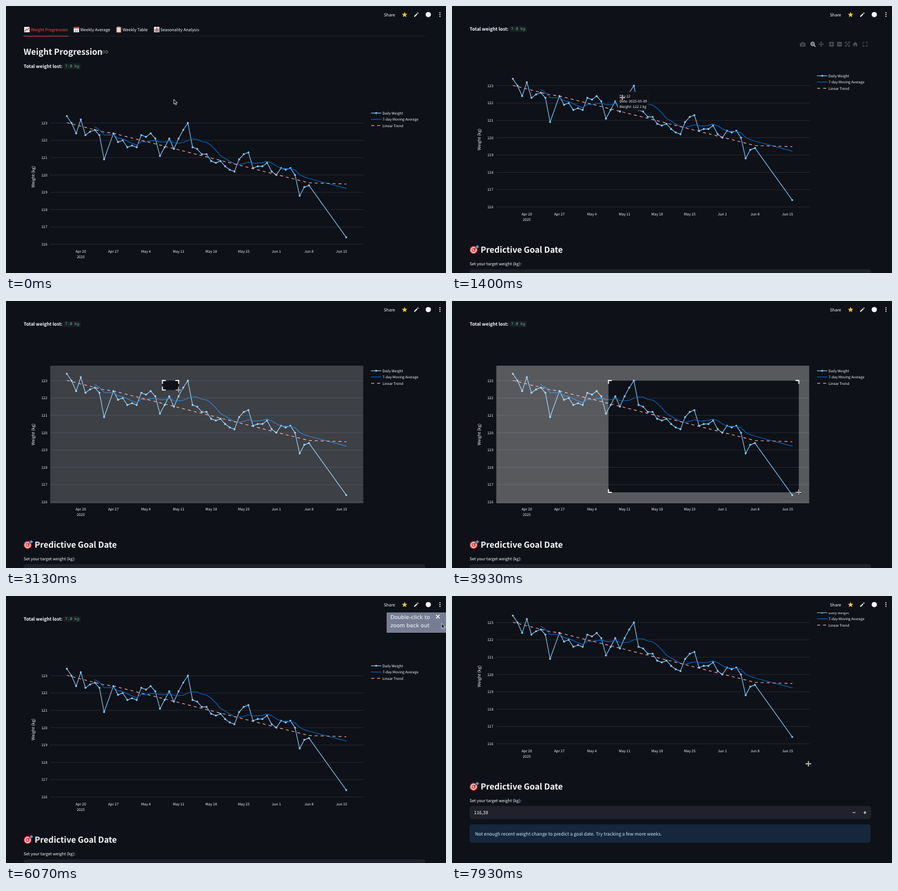
Animation of 800x487 px, one loop 8000 ms. Source, as an HTML page:

```html
<!DOCTYPE html>
<html lang="en">
<head>
<meta charset="utf-8">
<title>Weight dashboard</title>
<style>
html, body { margin: 0; width: 100%; height: 100%; overflow: hidden; background: #0e1117; }
svg { display: block; width: 100vw; height: 100vh; }
text { font-family: "Noto Sans CJK JP", "Noto Sans CJK SC", "Noto Sans CJK", "Open Sans", sans-serif; fill: #fafafa; text-rendering: geometricPrecision; }
.mono { font-family: "Noto Sans Mono", "DejaVu Sans Mono", monospace; fill: #4fc878; }
.note { font-family: "DejaVu Sans", sans-serif; fill: #fff; }
.ln { fill: none; stroke-linecap: round; stroke-linejoin: round; }
</style>
</head>
<body>
<svg id="stage" viewBox="0 0 800 487" preserveAspectRatio="none"></svg>
<script>
const LOOP = 8000;
const AREA = { l: 80.5, r: 650, t: 186, b: 437 };
const FULL = { x0: 110.6, dx: 8.466, y123: 213.4, dy: 31.6 };
const BOX = { x1: 284.5, y1: 145, x2: 630.5, y2: 349 };
const SCROLL = 68;
const BLUE = '#83c9ff', NAVY = '#0068c9', PINK = '#ffabab';

// Daily weights in tenths of a kg above 116; one day is missing, and so is the last week.
const tenths = [74, 70, 64, 72, 63, 65, 66, 63, 49, 64, 59, 60, 56, 57, 56, 63, 62, 64, 61, 51,
  56, 61, 55, 61, 66, 70, 56, 55, 52, 52, 48, 47, 48, 45, 43, 42, 49, 52, 53, 44, 45, 45, 47, 42,
  40, 44, 43, 44, 40, 28, 33, 34, 4];
const last = tenths.length - 1;
const daily = tenths.map((v, i) => ({ d: i === last ? 60 : i < 9 ? i : i + 1, w: 116 + v / 10 }));
const average = daily.slice(6).map((p, i) => ({
  d: p.d, w: daily.slice(i, i + 7).reduce((sum, q) => sum + q.w, 0) / 7
}));
const trend = daily.map((p, i) => ({ d: p.d, w: 123.02 - 3.54 * i / last }));

const day = d => new Date(Date.UTC(2025, 3, 17 + d));
const dayName = d => day(d).toLocaleDateString('en-US', { month: 'short', day: 'numeric', timeZone: 'UTC' });

const px = (v, d) => v.x0 + v.dx * d;
const py = (v, w) => v.y123 + v.dy * (123 - w);

// The view after the dragged box is stretched over the whole plot.
const kx = (AREA.r - AREA.l) / (BOX.x2 - BOX.x1), ky = (AREA.b - AREA.t) / (BOX.y2 - BOX.y1);
const ZOOM = {
  x0: AREA.l + (FULL.x0 - BOX.x1) * kx, dx: FULL.dx * kx,
  y123: AREA.t + (FULL.y123 - BOX.y1 - SCROLL) * ky, dy: FULL.dy * ky
};

const text = (x, y, s, size, more = '') => `<text x="${x}" y="${y}" font-size="${size}" ${more}>${s}</text>`;
const rect = (x, y, w, h, fill, more = '') => `<rect x="${x}" y="${y}" width="${w}" height="${h}" fill="${fill}" ${more}/>`;
const path = (d, stroke, w = 1, more = '') => `<path class="ln" d="${d}" stroke="${stroke}" stroke-width="${w}" ${more}/>`;
const dot = (x, y, r, fill) => `<circle cx="${x}" cy="${y}" r="${r}" fill="${fill}"/>`;
const bold = 'font-weight="600"', mid = 'text-anchor="middle"';
const DASH = 'stroke-dasharray="5.4" style="stroke-linecap:butt"';

function chart(v, id) {
  const line = pts => 'M' + pts.map(p => px(v, p.d).toFixed(2) + ' ' + py(v, p.w).toFixed(2)).join('L');
  let axes = '', first = true;
  for (let w = 116; w <= 123; w++) {
    const y = py(v, w);
    if (y < AREA.t - 1 || y > AREA.b) continue;
    axes += path(`M${AREA.l} ${y}H${AREA.r}`, '#31333f', .75) + text(75, y + 2.4, w, 6.5, 'text-anchor="end"');
  }
  for (let d = 3; d < 62; d += 7) {
    const x = px(v, d);
    if (x < AREA.l || x > AREA.r) continue;
    axes += text(x, 450.2, dayName(d), 6.5, mid);
    if (first) axes += text(x, 459.8, 2025, 6.5, mid);
    first = false;
  }
  return `<g id="${id}">${axes}<g clip-path="url(#plot)">` +
    path(line(daily), BLUE, 1.2) +
    daily.map(p => dot(px(v, p.d), py(v, p.w), 1.8, BLUE)).join('') +
    path(line(average), NAVY, 1.2) + path(line(trend), PINK, 1.2, DASH) + '</g></g>';
}

const tabs =
  rect(33, 38, 10, 10, '#e9edf0', 'rx="1"') + path('M34.5 46L37 42.5L39 44L42 39.5', '#e0393e', 1.3) +
  text(45, 46, 'Weight Progression', 7.5, 'style="fill:#ff4b4b"') +
  rect(123, 38, 10, 10, '#e9edf0', 'rx="1"') + rect(123, 38, 10, 3, '#d8383d') +
  text(128, 46.8, 17, 5.4, mid + ' style="fill:#444"') + text(135, 46, 'Weekly Average', 7.5) +
  rect(200.5, 38, 9, 10.5, '#a9764b', 'rx="1"') + rect(201.7, 39.5, 6.6, 8, '#eceff1') +
  rect(203, 37.5, 4, 2.4, '#8b98a2') + path('M203 42H207M203 44H207M203 46H207', '#a5afb5', .6) +
  text(212, 46, 'Weekly Table', 7.5) +
  rect(269, 38, 10, 10, '#e9edf0', 'rx="1"') + rect(270.3, 42, 2, 5.2, '#3da35a') +
  rect(273, 39.3, 2, 7.9, '#df4145') + rect(275.7, 40.8, 2, 6.4, '#2f80d0') +
  text(280.5, 46, 'Seasonality Analysis', 7.5) +
  path('M32 55H762', '#262730', .8) + path('M32 55H113', '#ff4b4b', 1.2);

const intro =
  text(32, 88.6, 'Weight Progression', 15, bold) +
  path('M179 81.4H177.4A2.2 2.2 0 0 0 177.4 86H179M181.5 81.4H183A2.2 2.2 0 0 1 183 86H181.5M178.2 83.7H182.2', '#85878e', 1) +
  text(32, 112.5, 'Total weight lost:', 8.4, bold) +
  rect(104.5, 104.5, 31.5, 11, '#1a1c24', 'rx="2"') + text(107.3, 112.4, '7.0 kg', 7.2, 'class="mono"');

const legend = ['Daily Weight', '7-day Moving Average', 'Linear Trend'].map((s, i) => {
  const y = 195.3 + 11.4 * i;
  return path(`M664 ${y}H682`, [BLUE, NAVY, PINK][i], 1.2, i === 2 ? DASH : '') +
    (i ? '' : dot(673, y, 1.8, BLUE)) + text(684.5, y + 2.4, s, 6.45);
}).join('');

const GREY = '#4c4e56';
const tools =
  rect(632.5, 135.3, 10, 6.6, GREY, 'rx="1"') + rect(635.5, 133.8, 4, 2, GREY) + dot(637.5, 138.5, 2.2, '#0e1117') + dot(637.5, 138.5, 1.2, GREY) +
  `<circle cx="655.6" cy="137" r="3" fill="none" stroke="#b9babd" stroke-width="1.5"/>` +
  path('M658 139.4L660.3 141.8', '#b9babd', 1.8) + path('M654.2 137H657M655.6 135.6V138.4', '#b9babd', .8) +
  path('M667 137.6H675.4M671.2 133.4V141.8M669.9 134.6L671.2 133.4L672.5 134.6M669.9 140.6L671.2 141.8L672.5 140.6M668.2 136.3L667 137.6L668.2 138.9M674.2 136.3L675.4 137.6L674.2 138.9', GREY, 1.1) +
  rect(685.8, 133.4, 8.6, 8.6, GREY, 'rx="1"') + path('M687.8 137.7H692.4M690.1 135.4V140', '#0e1117', 1.2) +
  rect(700.2, 133.4, 8.6, 8.6, GREY, 'rx="1"') + path('M702.2 137.7H706.8', '#0e1117', 1.2) +
  path('M715 136V133.6H717.4M720.6 133.6H723V136M723 139.4V141.8H720.6M717.4 141.8H715V139.4M716 134.6L722 140.8M722 134.6L716 140.8', GREY, 1.1) +
  `<path d="M728.4 138L733.2 133.2L738 138H736.7V141.8H734.3V139.2H732.1V141.8H729.7V138Z" fill="${GREY}"/>` +
  path('M747.2 136.4V134H749.6M752.4 134H754.8V136.4M754.8 139V141.4H752.4M749.6 141.4H747.2V139', GREY, 1.2);

const goal =
  dot(39.3, 513, 7.2, '#d9363b') + dot(39.3, 513, 5.4, '#f2f2f2') + dot(39.3, 513, 3.8, '#d9363b') + dot(39.3, 513, 2, '#f2f2f2') +
  path('M39.5 513L45 507.4', '#5a3a35', 1.2) + path('M44 508.4L44.4 506L46.6 504.6L47 506.6L48.6 507L47 509Z', '#4a9fd8', 1.1, 'style="fill:#4a9fd8"') +
  text(52, 517.6, 'Predictive Goal Date', 15, bold) +
  text(32, 541, 'Set your target weight (kg):', 7.5) +
  rect(32, 548, 730, 24, '#20212b', 'rx="4.5"') + text(40, 563.2, '116,38', 8.4) +
  path('M728.8 560H733.2M748.6 560H753M750.8 557.8V562.2', '#fafafa', 1.2) +
  rect(32, 581.5, 729, 33.5, '#16273d', 'rx="4.5"') +
  text(42, 601.5, 'Not enough recent weight change to predict a goal date. Try tracking a few more weeks.', 8.4, 'style="fill:#c7ebff"');

const star = Array.from({ length: 10 }, (_, i) => {
  const r = i % 2 ? 2.3 : 5.2, a = i * Math.PI / 5;
  return (724.7 + r * Math.sin(a)).toFixed(2) + ',' + (16 - r * Math.cos(a)).toFixed(2);
}).join(' ');
const header =
  rect(0, 0, 800, 30, '#0e1117') + text(687, 18.6, 'Share', 7.6) +
  `<polygon points="${star}" fill="#fcc42f"/>` +
  path('M743 18.8L747.6 14.2', '#fafafa', 2, 'style="stroke-linecap:butt"') +
  '<path d="M742 19.8L742.4 17.6L744.2 19.4ZM747.6 12.6L748.7 11.6L750.3 13.2L749.3 14.2Z" fill="#fafafa"/>' +
  dot(767.8, 15.7, 4.8, '#fafafa') + [12.2, 15.6, 19].map(y => dot(789, y, 1.05, '#fafafa')).join('');

const note =
  rect(692, 30, 108, 37, '#8c97af', 'opacity=".82"') +
  text(699, 42.3, 'Double-click to', 9.6, 'class="note"') + text(699, 57, 'zoom back out', 9.6, 'class="note"') +
  path('M782.3 34.8L787.9 40.4M787.9 34.8L782.3 40.4', '#fff', 1.5);

const PLUS = 'M-4.2 0H4.2M0 -4.2V4.2';
const plus = path(PLUS, '#15171c', 3.4) + path(PLUS, '#e4e4e6', 1.8) + path('M-3.6 0H3.6M0 -3.6V3.6', '#555', .5);
const arrow = '<path d="M0 0V9.2L2.2 7.2L3.6 10.4L5.1 9.7L3.7 6.6H6.5Z" fill="#111" stroke="#e8e8e8" stroke-width=".9" stroke-linejoin="round"/>';

document.getElementById('stage').innerHTML =
  `<clipPath id="plot">${rect(AREA.l, AREA.t, AREA.r - AREA.l, AREA.b - AREA.t, '#000')}</clipPath>` +
  `<g id="page">${tabs}${intro}${chart(FULL, 'full')}${chart(ZOOM, 'zoomed')}` +
  text(0, 0, 'Weight (kg)', 7.5, mid + ' transform="translate(51.6 311.5) rotate(-90)"') +
  `${legend}<g id="tools">${tools}</g><g id="tip"></g>${goal}</g>` +
  `<g id="select"><path id="dim" fill="#fff" fill-rule="evenodd"/>${path('', '#fff', 1.8, 'id="corners" style="stroke-linecap:butt;stroke-linejoin:miter"')}</g>` +
  `${header}<g id="note">${note}</g><g id="plus">${plus}</g><g id="arrow">${arrow}</g>`;

const el = {};
for (const id of ['page', 'full', 'zoomed', 'tools', 'tip', 'select', 'dim', 'corners', 'note', 'plus', 'arrow'])
  el[id] = document.getElementById(id);

const clamp = v => Math.max(0, Math.min(1, v));
const smooth = v => { v = clamp(v); return v * v * (3 - 2 * v); };
const show = (node, on) => { node.style.display = on ? '' : 'none'; };

// Pointer stops: time, x, y.
const stops = [
  [0, 305, 170], [600, 305, 171], [730, 267, 168], [900, 262, 167], [1250, 297, 177], [1600, 329, 152],
  [1950, 369, 160], [2250, 369, 160], [2800, 284.5, 145], [3000, 284.5, 145], [3730, 630.5, 349],
  [4070, 630.5, 349], [4800, 514, 218], [5350, 514, 218], [5900, 772, 86], [6070, 792, 50],
  [6270, 785, 37], [6480, 785, 37], [7150, 648, 306], [LOOP, 648, 306]
];
function pointer(t) {
  const i = Math.max(1, stops.findIndex(s => s[0] >= t));
  const [t0, x0, y0] = stops[i - 1], [t1, x1, y1] = stops[i];
  const k = smooth((t - t0) / (t1 - t0));
  return { x: x0 + (x1 - x0) * k, y: y0 + (y1 - y0) * k };
}

const scrollAt = t => SCROLL * smooth((t - 70) / 450) + 97 * smooth((t - 7540) / 380);

function tipFor(view, at, scroll) {
  let best = null, near = 15;
  for (const p of daily) {
    const x = px(view, p.d), y = py(view, p.w), r = Math.hypot(x - at.x, y - scroll - at.y);
    if (r < near) { near = r; best = { p, x, y }; }
  }
  if (!best) return '';
  const { p, x, y } = best, X = x + 7.6;
  return `<path d="M${x} ${y}L${x + 5} ${y - 3}V${y - 17}H${x + 60}V${y + 16.5}H${x + 5}V${y + 3}Z" fill="#0e1117" stroke="#22252d" stroke-width=".6"/>` +
    text(X, y - 6.8, 'Day ' + p.d, 6.45) +
    text(X, y + 2.6, 'Date: ' + day(p.d).toISOString().slice(0, 10), 6.45) +
    text(X, y + 12, `Weight: ${p.w.toFixed(1)} kg`, 6.45);
}

function draw(t) {
  const at = pointer(t), scroll = scrollAt(t);
  const drag = t > 3000 && t < 4000, zoomed = t >= 4000 && t < 5070;
  el.page.setAttribute('transform', `translate(0 ${-scroll})`);
  show(el.full, !zoomed);
  show(el.zoomed, zoomed);

  // Hover labels trail the pointer a little.
  const hover = t > 520 && t < 7500 && !drag;
  el.tip.innerHTML = hover ? tipFor(zoomed ? ZOOM : FULL, pointer(t - 80), scroll) : '';
  show(el.tools, t > 520 && !drag && at.x < 762);

  show(el.select, drag);
  if (drag) {
    const { x1, y1 } = BOX, x2 = Math.max(at.x, x1 + 1), y2 = Math.max(at.y, y1 + 1);
    const top = AREA.t - SCROLL, bottom = AREA.b - SCROLL;
    el.dim.setAttribute('d', `M${AREA.l} ${top}H${AREA.r - .5}V${bottom}H${AREA.l}ZM${x1} ${y1}V${y2}H${x2}V${y1}Z`);
    el.dim.setAttribute('opacity', .3 * clamp((t - 3000) / 200));
    const n = Math.min(6, (x2 - x1) / 2, (y2 - y1) / 2);
    el.corners.setAttribute('d', `M${x1} ${y1 + n}V${y1}H${x1 + n}M${x2 - n} ${y1}H${x2}V${y1 + n}` +
      `M${x2} ${y2 - n}V${y2}H${x2 - n}M${x1 + n} ${y2}H${x1}V${y2 - n}`);
  }

  const noteOn = clamp((t - 4000) / 600) * clamp((6700 - t) / 300);
  show(el.note, noteOn > 0);
  el.note.setAttribute('opacity', noteOn);

  const overPlot = t > 450 && at.x > AREA.l && at.x < AREA.r && at.y > 118 && at.y < 369;
  show(el.plus, overPlot);
  show(el.arrow, !overPlot);
  (overPlot ? el.plus : el.arrow).setAttribute('transform', `translate(${at.x} ${at.y})`);
}

const start = performance.now();
function tick(now) {
  draw(Math.max(0, now - start) % LOOP);
  requestAnimationFrame(tick);
}
draw(0);
requestAnimationFrame(tick);
</script>
</body>
</html>
```
